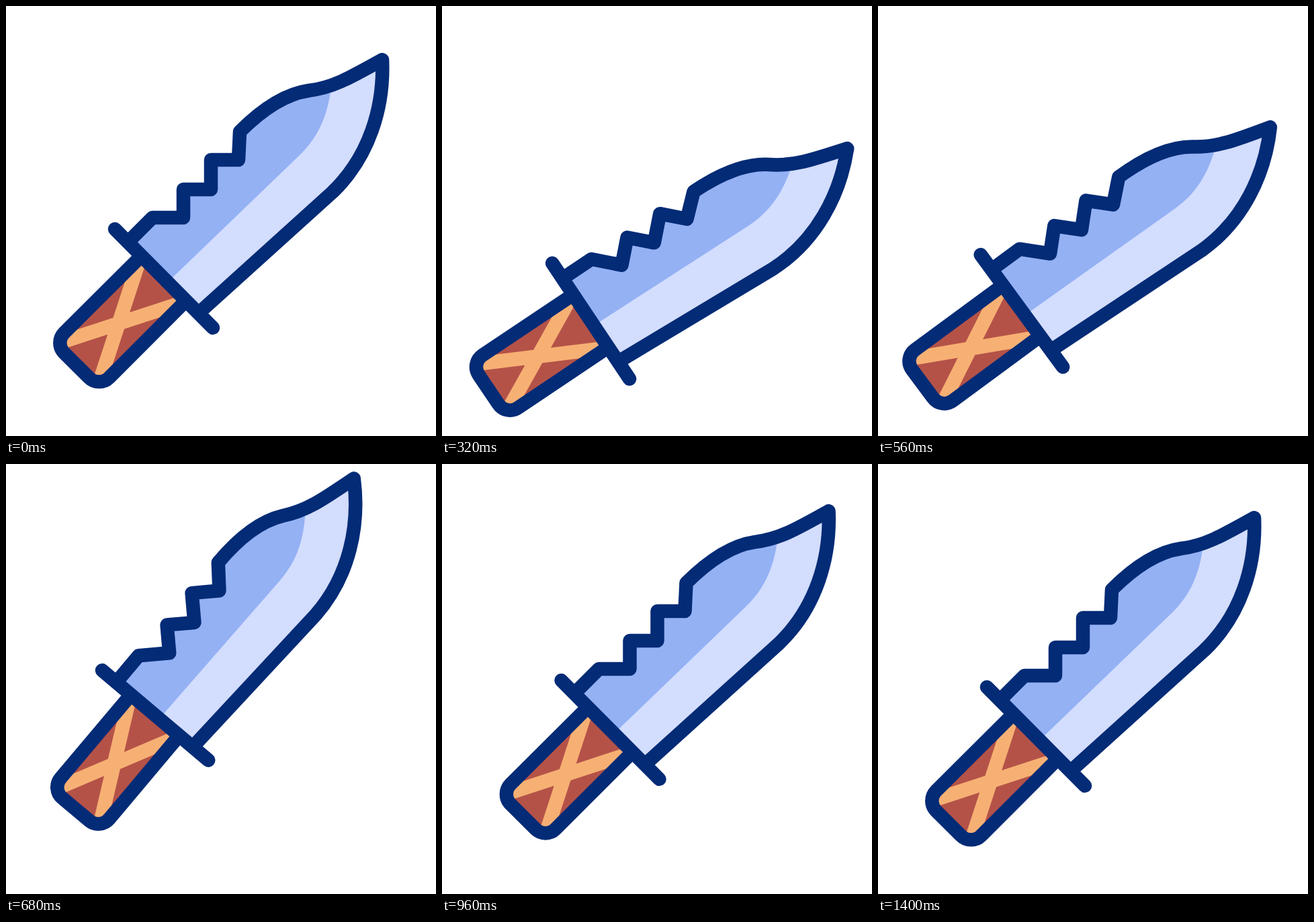
Animation, 640 px wide and 640 px high, one loop 1480 ms. Source, as an HTML page:

```html
<!DOCTYPE html>
<html lang="en">
<head>
<meta charset="utf-8">
<title>Knife</title>
<style>
  html, body { margin: 0; width: 100%; height: 100%; overflow: hidden; background: #fff; }
  svg { display: block; width: 100vw; height: 100vh; }
  .line { fill: none; stroke: #032b76; stroke-width: 20.5; stroke-linecap: round; stroke-linejoin: round; }
  .tape { fill: none; stroke: #f7b074; stroke-width: 21; }
</style>
</head>
<body>
<svg viewBox="0 0 640 640">
  <defs>
    <path id="blade" d="M184 349 L218 315 H264 V273 H305 V229 H346 L348 187
      C381 154 415 131 450 126 C485 122 510 108 560 80
      C563 150 541 224 486 277 L289 455"/>
    <path id="grip" d="M200 373.5 L86.5 486.5 A21 21 0 0 0 86.5 516.2 L123.7 553.2 A21 21 0 0 0 153.4 553.2 L268 438.6"/>
    <clipPath id="inBlade"><use href="#blade"/></clipPath>
    <clipPath id="inGrip"><use href="#grip"/></clipPath>
  </defs>
  <g id="knife">
    <use href="#grip" fill="#b45248"/>
    <path class="tape" clip-path="url(#inGrip)" d="M198 380 L139 560 M260.5 442 L80.5 501"/>
    <use href="#grip" class="line"/>
    <use href="#blade" fill="#94b1f4"/>
    <path clip-path="url(#inBlade)" fill="#d3ddfe"
      d="M485 110 C481 160 466 194 437 222 L247 405 L290 470 L600 300 V60 Z"/>
    <use href="#blade" class="line"/>
    <path class="line" d="M162 332 L308 479"/>
  </g>
</svg>
<script>
  const LOOP = 1480, STEP = 40;
  const knife = document.getElementById('knife');

  // Each move: start, end, four control points of the path, first and last angle.
  const down = [1.4, 113.2], up = [-20.6, -38.8], rest = [0, 0], thrust = [20, -16];
  const moves = [
    [36, 474, [rest, [0.8, 38], [1.9, 76], down], 0, 15.5],
    [480, 685, [down, [-10.6, 62.5], [-18.4, 12], up], 15.5, -5],
    [685, 885, [up, [-20.6, -50], [-6.8, -4.2], rest], -5, 0],
    [885, 1013, [rest, [6.8, 4.2], thrust, thrust], 0, 0],
    [1013, 1119, [thrust, thrust, rest, rest], 0, 0],
    [1119, 1250, [rest, [6.7, -5.3], [13.3, -10.7], thrust], 0, 0],
    [1250, 1396, [thrust, [13.3, -10.7], [6.7, -5.3], rest], 0, 0]
  ];

  const clamp = v => Math.min(1, Math.max(0, v));
  const smooth = s => s * s * (3 - 2 * s);

  function bezier(p, u, axis) {
    const v = 1 - u;
    return v * v * v * p[0][axis] + 3 * v * v * u * p[1][axis] +
      3 * v * u * u * p[2][axis] + u * u * u * p[3][axis];
  }

  function pose(t) {
    const [start, end, path, from, to] = moves.findLast(m => t >= m[0]) || moves[0];
    const u = smooth(clamp((t - start) / (end - start)));
    const x = 320 + bezier(path, u, 0), y = 320 + bezier(path, u, 1);
    const angle = from + (to - from) * u;
    knife.setAttribute('transform',
      `translate(${x.toFixed(2)} ${y.toFixed(2)}) rotate(${angle.toFixed(3)}) translate(-320 -320)`);
  }

  const begin = performance.now();
  function tick() {
    // The motion runs at 25 steps a second.
    const t = (performance.now() - begin) % LOOP;
    pose(Math.floor((t + 2) / STEP) * STEP);
    requestAnimationFrame(tick);
  }
  tick();
</script>
</body>
</html>
```
